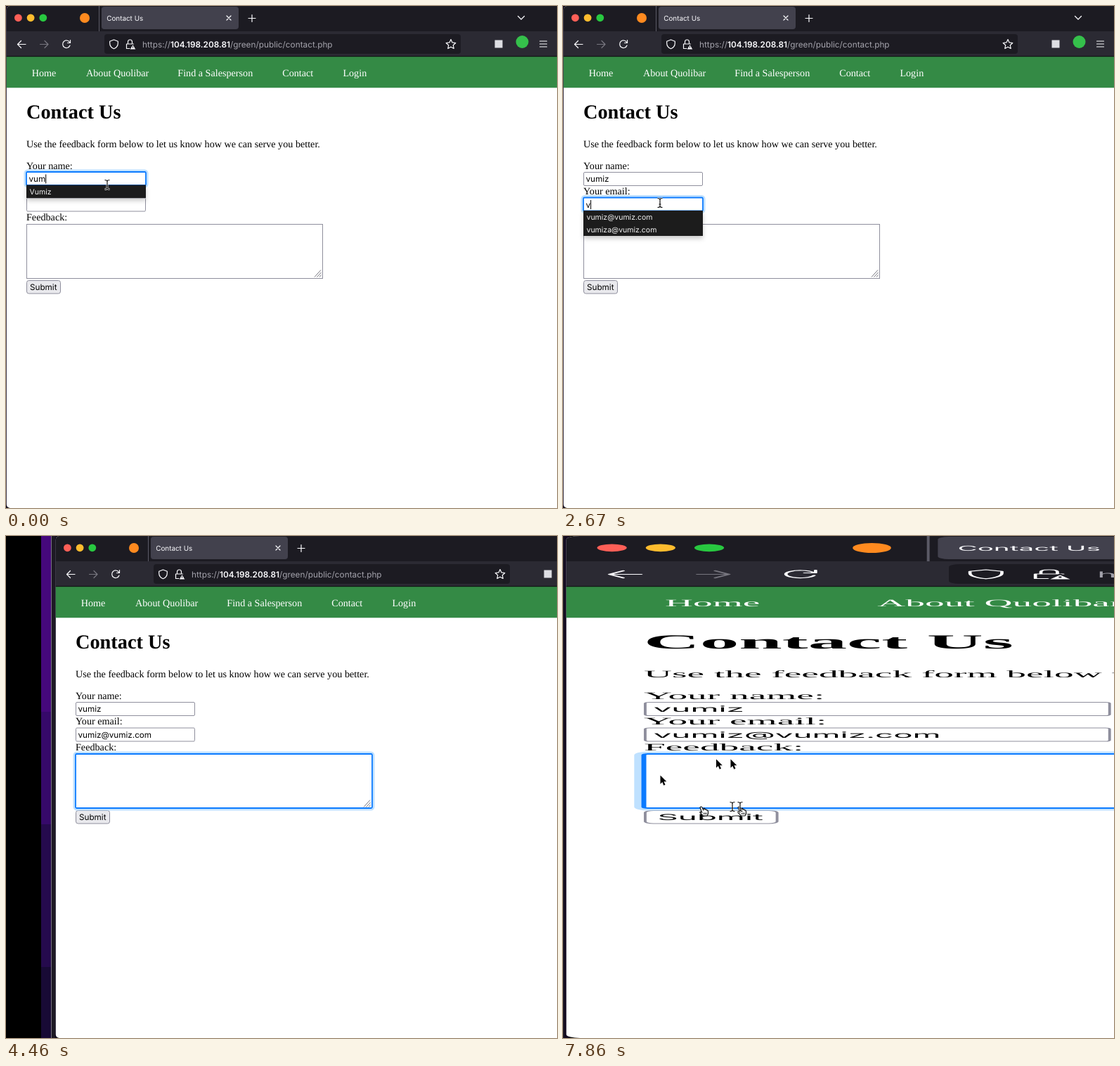
An HTML page that plays this animation: 784 by 714 pixels, repeating every 8000 ms.

```html
<!DOCTYPE html>
<html lang="en">
<head>
<meta charset="utf-8">
<title>Contact form</title>
<style>
html, body { margin: 0; width: 100%; height: 100%; overflow: hidden; background: #000; }
svg { display: block; width: 100vw; height: 100vh; }
text { white-space: pre; text-rendering: geometricPrecision; }
.ui { font-family: Inter, sans-serif; }
.page { font: 14.16px "Liberation Serif", serif; }
.field { font: 11.7px Inter, sans-serif; }
.menu { font: 10.5px Inter, sans-serif; fill: #f2f2f2; }
.icon { fill: none; stroke: #fbfbfe; stroke-width: 1.2; stroke-linecap: round; stroke-linejoin: round; }
.box { fill: #fff; stroke: #8f8f9d; }
</style>
</head>
<body>
<svg viewBox="0 0 784 714" preserveAspectRatio="none">
  <defs>
    <clipPath id="frame"><rect x=".8" width="1200" height="714" rx="5"/></clipPath>
    <filter id="soft" x="-20%" y="-60%" width="140%" height="240%"><feDropShadow dx="0" dy="4" stdDeviation="3" flood-opacity=".2"/></filter>
    <path id="arrow" d="M0 0V12.2L2.8 9.6 4.8 14.2 7 13.2 5 8.8H8.8Z" stroke="#fff" stroke-width="1.6" paint-order="stroke"/>
    <path id="stem" d="M-3.5-6.5Q0-6.5 0-4.5Q0-6.5 3.5-6.5M0-5V5M-3.5 6.5Q0 6.5 0 4.5Q0 6.5 3.5 6.5M-1.5 2H1.5"/>
    <g id="beam" fill="none">
      <use href="#stem" stroke="#fff" stroke-width="2.6"/>
      <use href="#stem" stroke="#111" stroke-width="1.2"/>
    </g>
    <g id="hand" stroke="#111">
      <path d="M0 1Q1.500-1 3 1L4.600 4.500Q6 0 7 4Q8.500 3 9.300 5Q11 4.500 11.500 7V10L10 13H4.500L0 8.500Q-.5 6.500 2.600 8Z" fill="#fff" stroke-width="1.2"/>
      <path d="M5.600 8.500V11M7.400 8.500V11M9.200 8.500V11" stroke-width=".9"/>
    </g>
  </defs>

  <g id="scene">
    <!-- desktop behind the window -->
    <rect x="-20" width="22" height="714" fill="#12091f"/>
    <g id="bands"></g>
    <path d="M-5.500 0V714" stroke="#77727f"/>
    <rect x="-5" width="5" height="714" fill="#1d1924"/>

    <g clip-path="url(#frame)">
      <rect width="1201" height="714" fill="#fff"/>
      <rect width="1201" height="36" fill="#1c1b22"/>
      <rect y="36" width="1201" height="36" fill="#2b2a33"/>
      <g id="lights"></g>
      <circle cx="112" cy="17" r="7" fill="#ff8a1f"/>
      <path d="M132.500 0V36" stroke="#5b5a66"/>
      <rect x="136" y="1" width="195" height="32" rx="4" fill="#42414d"/>
      <text class="ui" x="143.200" y="21" font-size="9.9" fill="#fbfbfe">Contact Us</text>
      <path class="icon" d="M314 14l6 6M320 14l-6 6"/>
      <path class="icon" d="M345 17.500h10M350 12.500v10M728.500 14.500l4.500 4.500 4.500-4.500"/>
      <path class="icon" d="M28 54.500H16.500M21.500 49.500l-5 5 5 5"/>
      <path class="icon" d="M48.500 54.500H60M55 49.500l5 5-5 5" style="stroke:#77767f"/>
      <path class="icon" d="M90.500 51.500A5.300 5.300 0 1 0 91 56M91.500 48.500v4h-4"/>
      <rect x="140" y="40" width="507" height="28" rx="4" fill="#1c1b22"/>
      <path class="icon" d="M153.500 48l5.800 2.200V53q0 5.500-5.800 7.800Q147.700 58.500 147.700 53v-2.800Z"/>
      <path class="icon" d="M177 60.500h-5.500V54h10M173.500 54v-3q0-3 3-3t3 3v3"/>
      <path d="M180.500 54.500l4.500 7.500h-9Z" fill="#fbfbfe" stroke="#1c1b22"/>
      <path d="M180.500 57.500v2" stroke="#1c1b22"/>
      <text class="ui" x="194" y="58.800" font-size="11.8" fill="#a3a2ab">https://<tspan fill="#fbfbfe" font-weight="600">104.198.208.81</tspan>/green/public/contact.php</text>
      <path class="icon" d="M633 47.500l2 4.400 4.800.6-3.500 3.300.9 4.700-4.200-2.300-4.200 2.300.9-4.700-3.500-3.300 4.800-.6Z"/>
      <rect x="695.500" y="48.500" width="11" height="11" fill="#dedee3"/>
      <circle cx="734.500" cy="51" r="9" fill="#35c04b"/>
      <path class="icon" d="M759.500 50h10M759.500 54h10M759.500 58h10"/>

      <rect y="72" width="1201" height="44.300" fill="#348a45"/>
      <path d="M0 71.700H1201" stroke="#0c0c0d"/>
      <g id="nav" class="page" fill="#fff"></g>
      <g class="page">
        <text x="29" y="159.700" font-size="28.320" font-weight="bold">Contact Us</text>
        <text x="29" y="200.500">Use the feedback form below to let us know how we can serve you better.</text>
        <text x="29" y="231.500">Your name:</text>
        <text x="29" y="268">Your email:</text>
        <text x="29" y="304.500">Feedback:</text>
      </g>
      <rect class="box" x="29.500" y="236.500" width="169" height="19" rx="1.500"/>
      <rect class="box" x="29.500" y="273" width="169" height="19" rx="1.500"/>
      <rect class="box" x="29.500" y="310.500" width="421" height="77"/>
      <rect id="button" class="box" x="29.500" y="390.500" width="48" height="18.500" rx="3"/>
      <text class="field" x="34" y="404">Submit</text>
      <g id="ring" fill="#fff">
        <rect id="halo" stroke="#bfe1ff" stroke-width="2.600" rx="4"/>
        <rect id="edge" stroke="#0a7aff" stroke-width="1.800" rx="1.500"/>
      </g>
      <path d="M439 385.500l9-10M442.500 385.500l6-6.500M446 385.500l2.500-3" stroke="#77767f"/>
      <text id="name" class="field" x="32.500" y="250"></text>
      <text id="email" class="field" x="32.500" y="286.700"></text>
      <path id="caret" stroke="#000"/>
      <g id="menu" class="menu">
        <rect id="panel" x="29" width="170" fill="#1d1d1e" filter="url(#soft)"/>
        <rect id="pick" x="29" width="170" height="18" fill="#0a5bd0"/>
        <text id="row0" x="33.500"></text>
        <text id="row1" x="33.500"></text>
      </g>
    </g>
  </g>
  <use id="pointer"/>
  <g id="trail"></g>
</svg>
<script>
const $ = id => document.getElementById(id);
const set = (el, attrs) => { for (const k in attrs) el.setAttribute(k, attrs[k]); };
const show = (el, on) => el.setAttribute('visibility', on ? 'inherit' : 'hidden');
const LOOP = 8000;

$('bands').innerHTML = '<rect x="-80" width="60" height="714"/>' +
  [[0, 250, '#45087c'], [250, 160, '#36096a'], [410, 203, '#250a4d'], [613, 101, '#180a35']]
    .map(([y, h, c]) => `<rect x="-20" y="${y}" width="14" height="${h}" fill="${c}"/>`).join('');
$('lights').innerHTML = ['#ff5f57', '#febc2e', '#28c840']
  .map((c, i) => `<circle cx="${17.4 + i * 17.7}" cy="16.8" r="5.4" fill="${c}"/>`).join('');
$('nav').innerHTML = [[36.7, 'Home'], [114, 'About Quolibar'], [244.3, 'Find a Salesperson'], [393.2, 'Contact'], [479.4, 'Login']]
  .map(([x, s]) => `<text x="${x}" y="99.500">${s}</text>`).join('');

const fields = {
  name: { box: [29, 236, 170, 19], caretY: 239.5 },
  email: { box: [29, 272.5, 170, 19], caretY: 276 },
  feedback: { box: [29, 310, 422, 77], caretY: 314 }
};
const menus = {
  name: { y: 254.5, h: 18.5, rows: ['Vumiz'] },
  email: { y: 291, h: 36, rows: ['vumiz@vumiz.com', 'vumiza@vumiz.com'] }
};
const views = {
  normal: '',
  moved: 'translate(70 0)',
  wide: 'translate(1.6 0) scale(3.91 1)'
};

// Each step changes only the listed parts of the state.
const steps = [
  [0, { name: 'vum', email: '', focus: 'name', menu: 'name', pick: -1, caret: 1, pointer: ['beam', 144, 254], view: 'normal' }],
  [150, { name: 'vumi' }],
  [290, { caret: 0 }],
  [590, { name: 'vumiz' }],
  [890, { focus: '', menu: '', pointer: ['arrow', 218, 288] }],
  [1040, { pointer: ['arrow', 254, 279] }],
  [1190, { pointer: ['arrow', 263, 275] }],
  [1340, { pointer: ['arrow', 222, 277] }],
  [1480, { pointer: ['beam', 146, 280] }],
  [1630, { focus: 'email', caret: 1, pointer: ['beam', 138, 280] }],
  [1920, { email: 'v', menu: 'email' }],
  [2220, { caret: 0 }],
  [2670, { caret: 1 }],
  [2820, { pointer: ['beam', 138, 284] }],
  [2970, { pick: 0, pointer: ['arrow', 138, 298] }],
  [3120, { caret: 0, pointer: ['arrow', 139, 301] }],
  [3570, { caret: 1 }],
  [3720, { email: 'vumiz@vumiz.com', menu: '', pick: -1, pointer: ['arrow', 139, 304] }],
  [3870, { pointer: ['beam', 139, 335] }],
  [4010, { focus: 'feedback', pointer: ['beam', 139, 341] }],
  [4460, { view: 'moved', caret: 0, pointer: null }],
  [4670, { view: 'wide' }]
];
let last = {};
const states = steps.map(([at, change]) => ({ at, ...(last = { ...last, ...change }) }));

// Pointers that stay on screen once they appear.
const trail = [
  [5120, 'arrow', 138.5, 340.5], [5270, 'arrow', 218, 317.5], [5420, 'arrow', 238.5, 317.5],
  [6290, 'hand', 249, 385], [7120, 'hand', 195, 385], [7420, 'beam', 241, 385], [7720, 'beam', 252, 385]
].map(([at, kind, x, y]) => {
  const el = document.createElementNS('http://www.w3.org/2000/svg', 'use');
  set(el, { href: '#' + kind, transform: `translate(${x} ${y})` });
  $('trail').append(el);
  return { at, el };
});

const place = (el, [x, y, w, h], grow) =>
  set(el, { x: x - grow, y: y - grow, width: w + 2 * grow, height: h + 2 * grow });

function draw(s) {
  set($('scene'), { transform: views[s.view] });
  set($('button'), { style: `fill:${s.view === 'wide' ? '#fff' : '#e9e9ed'}` });
  $('name').textContent = s.name;
  $('email').textContent = s.email;

  const field = fields[s.focus];
  show($('ring'), field);
  show($('caret'), field && s.caret);
  if (field) {
    place($('halo'), field.box, 2.2);
    place($('edge'), field.box, 0);
    const text = s[s.focus];
    const x = 33 + (text ? $(s.focus).getComputedTextLength() : 0);
    set($('caret'), { d: `M${x} ${field.caretY}v13` });
  }

  const menu = menus[s.menu];
  show($('menu'), menu);
  show($('pick'), menu && s.pick >= 0);
  if (menu) {
    set($('panel'), { y: menu.y, height: menu.h });
    set($('pick'), { y: menu.y + 18 * Math.max(s.pick, 0) });
    for (const i of [0, 1]) {
      $('row' + i).textContent = menu.rows[i] || '';
      set($('row' + i), { y: menu.y + 13.2 + 18 * i });
    }
  }

  show($('pointer'), s.pointer);
  if (s.pointer) {
    const [kind, x, y] = s.pointer;
    set($('pointer'), { href: '#' + kind, transform: `translate(${x} ${y})` });
  }
}

let shown = null;
function tick() {
  const t = performance.now() % LOOP;
  const s = states.findLast(step => step.at <= t);
  if (s !== shown) draw(shown = s);
  for (const mark of trail) show(mark.el, t >= mark.at);
  requestAnimationFrame(tick);
}
tick();
</script>
</body>
</html>
```
